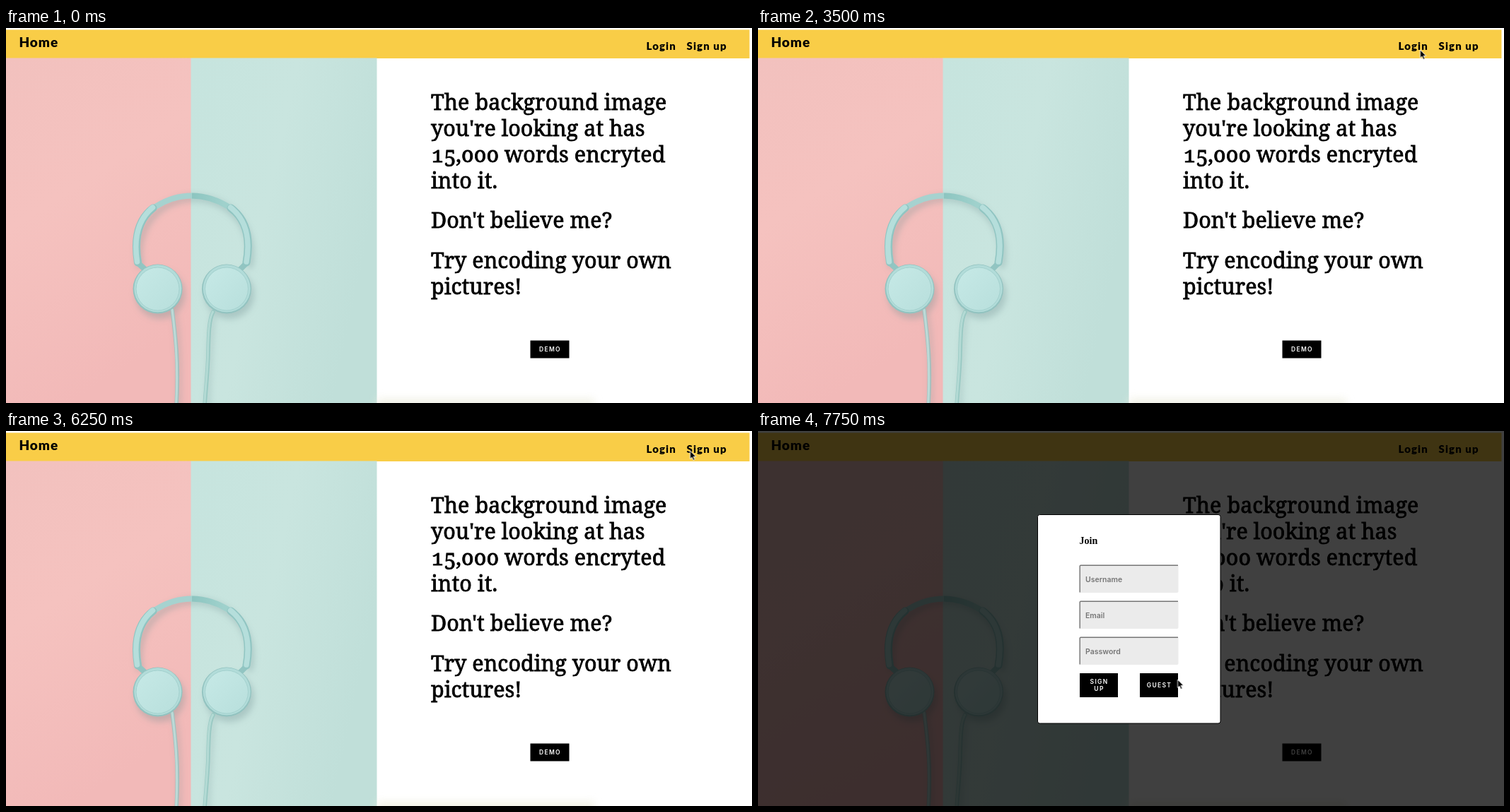
Animation, 1055 px wide and 531 px high, one loop 8 s. Source, as an HTML page:

```html
<!DOCTYPE html>
<html lang="en">
<head>
<meta charset="utf-8">
<title>Picture encoder</title>
<style>
  html, body { margin: 0; width: 100%; height: 100%; overflow: hidden; background: #fff; }
  svg { display: block; width: 1055px; height: 531px; }
  .nav { font: 900 15px Lato, sans-serif; letter-spacing: 1.1px; }
  .home { font-size: 19px; letter-spacing: .9px; }
  .pitch { font: 400 30.4px "Noto Serif", serif; font-variant-numeric: oldstyle-nums; letter-spacing: .08px; stroke: #000; stroke-width: .8px; }
  .button { font: 600 8.5px Inter, sans-serif; letter-spacing: 1.3px; fill: #fff; text-anchor: middle; }
  .field { font: 600 10.5px Inter, sans-serif; fill: #757575; }
  .title { font: 700 14px "Liberation Serif", serif; }
  .caret { animation: blink 8s step-end infinite; }
  .modal { animation: open 8s step-end infinite; }
  .pointer { animation: move 8s step-end infinite; }

  /* one step of 250 ms is 3.125% */
  @keyframes blink {
    0% { opacity: 0 } 3.125% { opacity: 1 } 6.25% { opacity: .5 } 9.375% { opacity: 0 }
    12.5% { opacity: 1 } 15.625% { opacity: 0 } 21.875% { opacity: 1 } 25% { opacity: 0 }
    28.125% { opacity: 1 } 31.25% { opacity: 0 } 34.375% { opacity: 1 } 37.5% { opacity: 0 }
    40.625% { opacity: 1 } 43.75% { opacity: 0 } 46.875% { opacity: 1 } 50% { opacity: 0 }
    56.25% { opacity: 1 } 59.375% { opacity: 0 } 65.625% { opacity: 1 } 68.75% { opacity: .5 }
    71.875% { opacity: 0 } 75% { opacity: 1 } 78.125% { opacity: 0 } 81.25% { opacity: 1 }
    87.5% { opacity: 0 } 90.625% { opacity: 1 } 93.75%, 100% { opacity: 0 }
  }
  @keyframes open {
    0% { visibility: hidden }
    81.25%, 100% { visibility: visible }
  }
  @keyframes move {
    0% { transform: translate(546px, 158px); opacity: 0 }
    28.125% { transform: translate(546px, 158px); opacity: 1 }
    31.25% { transform: translate(770px, 126px); opacity: 1 }
    34.375% { transform: translate(948px, 88px); opacity: 1 }
    37.5% { transform: translate(940px, 52px); opacity: 1 }
    40.625% { transform: translate(937px, 35px); opacity: 1 }
    43.75% { transform: translate(936.5px, 31px); opacity: 1 }
    46.875% { transform: translate(952px, 30px); opacity: 1 }
    50% { transform: translate(968px, 29px); opacity: 1 }
    53.125% { transform: translate(967.5px, 28px); opacity: 1 }
    87.5% { transform: translate(900px, 112px); opacity: 1 }
    90.625% { transform: translate(730px, 255px); opacity: 1 }
    93.75% { transform: translate(622px, 338px); opacity: 1 }
    96.875%, 100% { transform: translate(593.5px, 352px); opacity: 1 }
  }
</style>
</head>
<body>
<svg viewBox="0 0 1055 531">
  <defs>
    <linearGradient id="pink" x1="0" y1="0" x2=".35" y2="1">
      <stop offset="0" stop-color="#f2c1be"/>
      <stop offset=".45" stop-color="#f5c2bf"/>
      <stop offset="1" stop-color="#f2b9b8"/>
    </linearGradient>
    <linearGradient id="mint" x1="0" y1="0" x2="1" y2=".4">
      <stop offset="0" stop-color="#c6e4de"/>
      <stop offset=".5" stop-color="#c9e5df"/>
      <stop offset="1" stop-color="#c0dfd9"/>
    </linearGradient>
    <linearGradient id="band">
      <stop offset=".5" stop-color="#a6d2cf"/>
      <stop offset=".5" stop-color="#8cc5c0"/>
      <stop offset=".9" stop-color="#9fd1cc"/>
    </linearGradient>
    <linearGradient id="face" x1="0" y1="0" x2="1" y2="1">
      <stop offset="0" stop-color="#c6e9e6"/>
      <stop offset="1" stop-color="#b8dfdc"/>
    </linearGradient>
    <filter id="soft" x="-20%" y="-20%" width="140%" height="140%"><feGaussianBlur stdDeviation="5"/></filter>
    <filter id="glow" x="-10%" y="-100%" width="120%" height="300%"><feGaussianBlur stdDeviation="6"/></filter>
    <clipPath id="photo"><path d="M0 42.500H524.500V531H0Z"/></clipPath>
    <g id="cup">
      <circle r="35" fill="#92c3c0"/>
      <circle r="33.500" cx=".2" cy="-.8" fill="#b2dcd9"/>
      <circle r="30.500" fill="url(#face)" stroke="#a3d1ce"/>
    </g>
    <g id="input">
      <rect width="140" height="39.5" rx="2" fill="#ebebeb"/>
      <path d="M.7 39V2Q.7.7 2 .7H139.5" fill="none" stroke="#777" stroke-width="1.4"/>
    </g>
  </defs>

  <rect width="1055" height="531" fill="#fff"/>
  <path d="M0 2.500H1051.500V43H0Z" fill="#f9cd47"/>
  <g class="nav">
    <text class="home" x="18.5" y="26.5">Home</text>
    <text x="905.5" y="30.5">Login</text>
    <text x="962.5" y="30.5">Sign up</text>
  </g>

  <g clip-path="url(#photo)">
    <path d="M0 42H262V531H0Z" fill="url(#pink)"/>
    <path d="M261.5 42H525V531H261.5Z" fill="url(#mint)"/>
    <g filter="url(#soft)" opacity=".34" fill="none" stroke="#6f8f91" stroke-width="9">
      <path d="M190 340C178 283 218 241 266 241S357 283 344 340"/>
      <path d="M239 405Q247 460 244 540M293 405Q288 450 285 540" stroke-width="5"/>
      <g fill="#6f8f91" stroke="none"><circle cx="218" cy="377" r="35"/><circle cx="316" cy="377" r="35"/></g>
    </g>
    <g fill="none" stroke-linecap="round">
      <path d="M235 399C237 415 239 430 241 455S243 500 241 535" stroke="#a3bfbd" stroke-width="5.500"/>
      <path d="M235 399C237 415 239 430 240.500 455S242.500 500 240.500 535" stroke="#bcdad7" stroke-width="3.200"/>
      <path d="M293 402C287 412 286.500 435 286 460S283 505 281 535" stroke="#97c8c2" stroke-width="5.500"/>
      <path d="M292.500 402C286.500 412 286 435 285.500 460S282.500 505 280.500 535" stroke="#b3dad4" stroke-width="3.200"/>
      <path d="M188 334L199 344M339 334L329 344" stroke="#92c5c2" stroke-width="8"/>
      <path d="M207 256Q233 237.500 262.500 237.500T319 256" stroke="url(#band)" stroke-width="8"/>
      <path d="M186.500 332C181 299 186 272 208 255M340 332C346 299 341 272 318 255" stroke="#90c5c2" stroke-width="11"/>
      <path d="M185.500 331C180.500 299 185.500 272 207.500 254M340 331C345.500 299 340.500 272 317.500 254" stroke="#b5dedb" stroke-width="7.500"/>
    </g>
    <use href="#cup" x="214.500" y="369.500"/>
    <use href="#cup" x="312" y="369.500"/>
  </g>

  <g class="pitch">
    <text x="601" y="116">The background image</text>
    <text x="601" y="153">you're looking at has</text>
    <text x="601" y="190">15,000 words encryted</text>
    <text x="601" y="227">into it.</text>
    <text x="601" y="283">Don't believe me?</text>
    <text x="601" y="340">Try encoding your own</text>
    <text x="601" y="377">pictures!</text>
  </g>
  <path d="M741.500 442.500H796.500V467.500H741.500Z"/>
  <text class="button" x="769.500" y="458">DEMO</text>
  <path d="M525 525H832V545H525Z" fill="#eeeee0" opacity=".8" filter="url(#glow)"/>
  <path class="caret" d="M1048 44H1049V53H1048Z"/>

  <g class="modal">
    <rect width="1055" height="531" opacity=".75"/>
    <rect x="395.500" y="118.500" width="258.500" height="295.500" rx="3" fill="#fff" stroke="#000"/>
    <text class="title" x="454.500" y="160">Join</text>
    <use href="#input" x="454.500" y="189.500"/>
    <use href="#input" x="454.500" y="240.500"/>
    <use href="#input" x="454.500" y="291.500"/>
    <g class="field">
      <text x="463" y="214">Username</text>
      <text x="463" y="265">Email</text>
      <text x="463" y="316">Password</text>
    </g>
    <path d="M455 343H509V377H455ZM540 343H594V377H540Z"/>
    <g class="button">
      <text x="482.500" y="358">SIGN</text>
      <text x="482.500" y="367.500">UP</text>
      <text x="567.500" y="363">GUEST</text>
    </g>
  </g>

  <g class="pointer">
    <path d="M0 0V11.500L2.600 9.200L4.500 13.500L6.500 12.600L4.700 8.400H8.200Z" stroke="#fff" stroke-width=".9"/>
  </g>
</svg>
</body>
</html>
```
